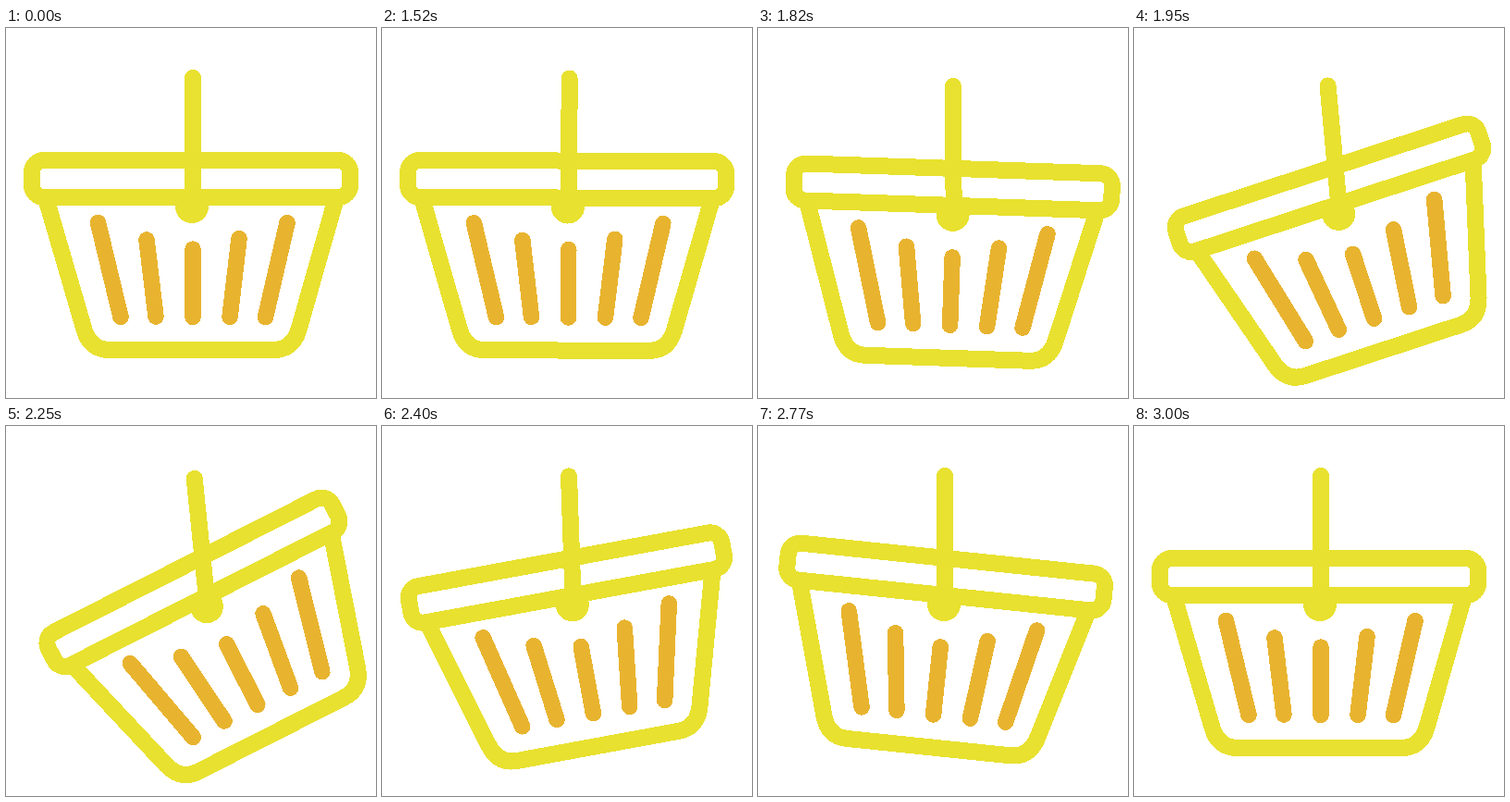
Recreate the animation shown at these times as an HTML page. Size 400 px wide and 400 px high, loop 3020 ms.

```html
<!DOCTYPE html>
<html lang="en">
<head>
<meta charset="utf-8">
<title>Swinging basket</title>
<style>
  html, body { margin: 0; height: 100%; overflow: hidden; background: #fff; }
  svg { display: block; width: 100%; height: 100%; shape-rendering: crispEdges; }
  path, rect { fill: none; stroke: #e8e12f; stroke-width: 18; stroke-linecap: round; }
  circle { fill: #e8e12f; }
  .bars { stroke: #e8b42f; stroke-width: 17.5; }
</style>
</head>
<body>
<svg viewBox="0 0 400 400">
  <g id="whole">
    <g id="basket">
      <rect x="28" y="143" width="344" height="40" rx="13"/>
      <path d="M44 187L84.5 326Q91 348 112 348H289Q310 348 316.5 326L356 187"/>
      <circle cx="201" cy="193" r="18"/>
      <path class="bars" d="M99.5 210.5L124 312.5M152 229L162 312M202 239V312.5M252 227.5L242 312.5M304 210.5L280.5 312.5"/>
    </g>
    <path d="M202 54V190"/>
  </g>
</svg>
<script>
const LOOP = 3020;
const START = 1510;
const whole = document.getElementById('whole');
const basket = document.getElementById('basket');

// Each track is a list of [time in ms, value].
const tracks = {
  x: [[START, 0], [1790, 9], [2430, 0]],
  y: [[START, 0], [1860, 9], [2480, 0]],
  swing: [[START, 0], [1650, 2], [1790, 0], [2070, -8.6], [2550, 0]],
  tilt: [[START, 0], [1792, 3], [2065, -31], [2140, -32], [2640, 8.5], [3000, 0]]
};

const easeOut = u => u * (2 - u);
const easeInOut = u => u * u * (3 - 2 * u);

function valueAt(keys, t) {
  const next = keys.findIndex(key => key[0] > t);
  if (next < 1) return 0;
  const [t0, v0] = keys[next - 1];
  const [t1, v1] = keys[next];
  const ease = t0 === START ? easeOut : easeInOut;
  return v0 + (v1 - v0) * ease((t - t0) / (t1 - t0));
}

function draw(now) {
  const t = now % LOOP;
  const [x, y, swing, tilt] = Object.values(tracks).map(keys => valueAt(keys, t));
  whole.setAttribute('transform', `translate(${x} ${y}) rotate(${swing} 202 54)`);
  basket.setAttribute('transform', `rotate(${tilt - swing} 201 193)`);
}

const begin = performance.now();
function tick() {
  draw(performance.now() - begin);
  requestAnimationFrame(tick);
}
tick();
</script>
</body>
</html>
```
